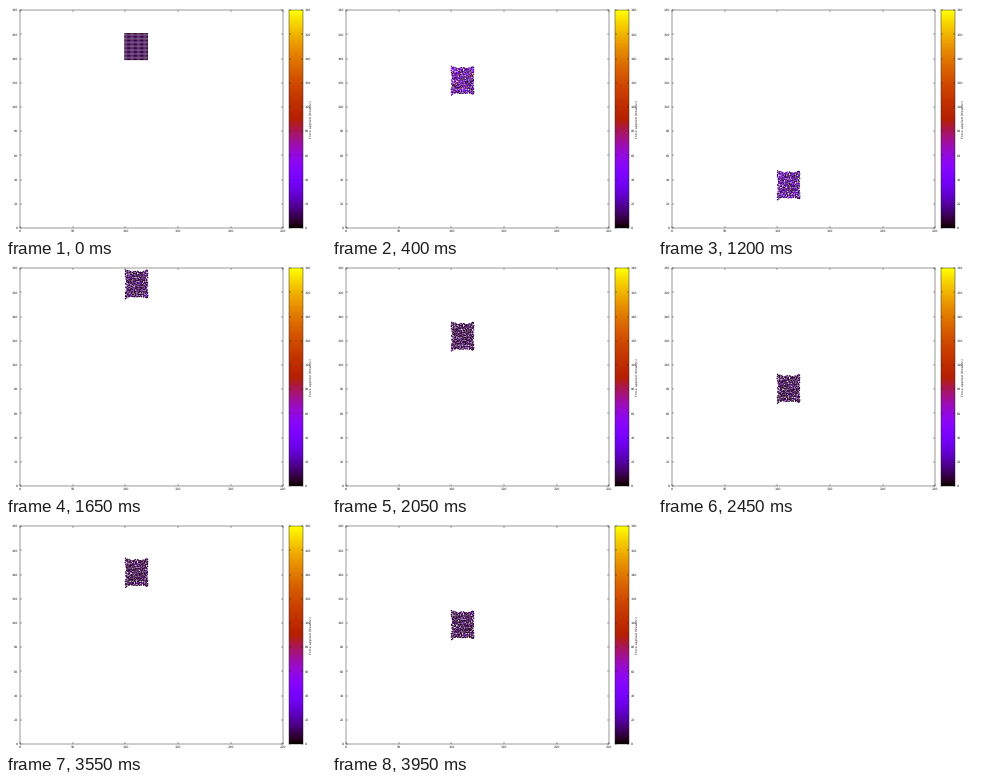
These frames come from a looping animation (320x230 px, 4 s). A matplotlib script:

```python
import numpy as np
import matplotlib.pyplot as plt
from matplotlib.animation import FuncAnimation

W, H, DPI = 320, 230, 80
FRAMES, STEP_MS = 80, 50
HEIGHT = 180          # the vertical axis is periodic
SPEED, RAMP = 5.4, 5.6  # units per frame, frames needed to reach full speed
PX = 72 / DPI         # one pixel in points
INK = "#222222"

plt.rcParams.update({
    "font.family": "DejaVu Sans",
    "font.size": 3.4 * PX,
    "text.hinting": "none",
    "text.color": INK,
    "axes.edgecolor": INK,
    "axes.linewidth": 0.45 * PX,
    "xtick.color": INK,
    "ytick.color": INK,
})

fig = plt.figure(figsize=(W / DPI, H / DPI), dpi=DPI, facecolor="white")


def add_axes(left, top, right, bottom):
    return fig.add_axes([left / W, 1 - bottom / H,
                         (right - left) / W, (bottom - top) / H])


def style_ticks(ax, **sides):
    ax.tick_params(direction="in", length=2 * PX, width=0.4 * PX,
                   pad=2 * PX, **sides)


ax = add_axes(14.2, 4.3, 277.2, 222)
ax.set(xlim=(0, 250), ylim=(0, HEIGHT),
       xticks=range(0, 251, 50), yticks=range(0, 181, 20))
style_ticks(ax, top=True, right=True)

bar = add_axes(283.3, 4.3, 296.8, 222)
bar.imshow(np.linspace(0, 1, 512)[:, None], cmap="gnuplot", origin="lower",
           extent=(0, 1, 0, 180), aspect="auto")
bar.set(xticks=[], yticks=range(0, 181, 20))
bar.yaxis.tick_right()
style_ticks(bar, left=True, right=True)
fig.text(304.6 / W, 1 - 113 / H, "Force applied (Newton)", rotation=90,
         ha="center", va="center", fontsize=3.3 * PX)

# Square lattice of particles, u and v in [-1, 1]
SIDE, HALF = 20, 10.65
u, v = (g.ravel() for g in np.meshgrid(*[np.linspace(-1, 1, SIDE)] * 2))
rng = np.random.default_rng(4)
noise = rng.normal(0, 0.27, (2, u.size))
phase = rng.uniform(0, 2 * np.pi, (2, u.size))

dots = ax.scatter(u, v, s=(1.45 * PX) ** 2, c=np.zeros(u.size),
                  cmap="gnuplot", vmin=0, vmax=180, linewidths=0,
                  clip_on=False, zorder=3)


def fallen(k):
    if k < RAMP:
        return SPEED * k * k / (2 * RAMP)
    return SPEED * (k - RAMP / 2)


def positions(k):
    mix = 1 - np.exp(-k / 4)
    wobble = noise + 0.12 * np.sin(phase + 0.9 * k)
    # edges sink in, corners and edge centres stand out
    dent_x = -0.07 + 0.08 * v**2 + 0.03 * np.cos(3 * np.pi * v)
    dent_y = -0.05 + 0.08 * u**2 + 0.04 * np.cos(2 * np.pi * u)
    x = 110.2 + HALF * u + mix * (0.5 + HALF * u * dent_x + wobble[0])
    y = 150 + HALF * v + mix * (HALF * v * dent_y + wobble[1]) - fallen(k)
    return np.column_stack([x, y % HEIGHT])


def forces(k):
    if k == 0:
        edge = (np.abs(u) > 0.99) | (np.abs(v) > 0.99)
        return np.where(edge, 5, 9)
    heat = 4 + 20 * np.exp(-((k - 13) / 13) ** 2)
    return 4 + np.random.default_rng(k).exponential(heat, u.size)


def update(k):
    dots.set_offsets(positions(k))
    dots.set_array(forces(k))
    return (dots,)


anim = FuncAnimation(fig, update, frames=FRAMES, interval=STEP_MS,
                     init_func=lambda: update(0), repeat=True,
                     repeat_delay=0, blit=False)
plt.show()
```
